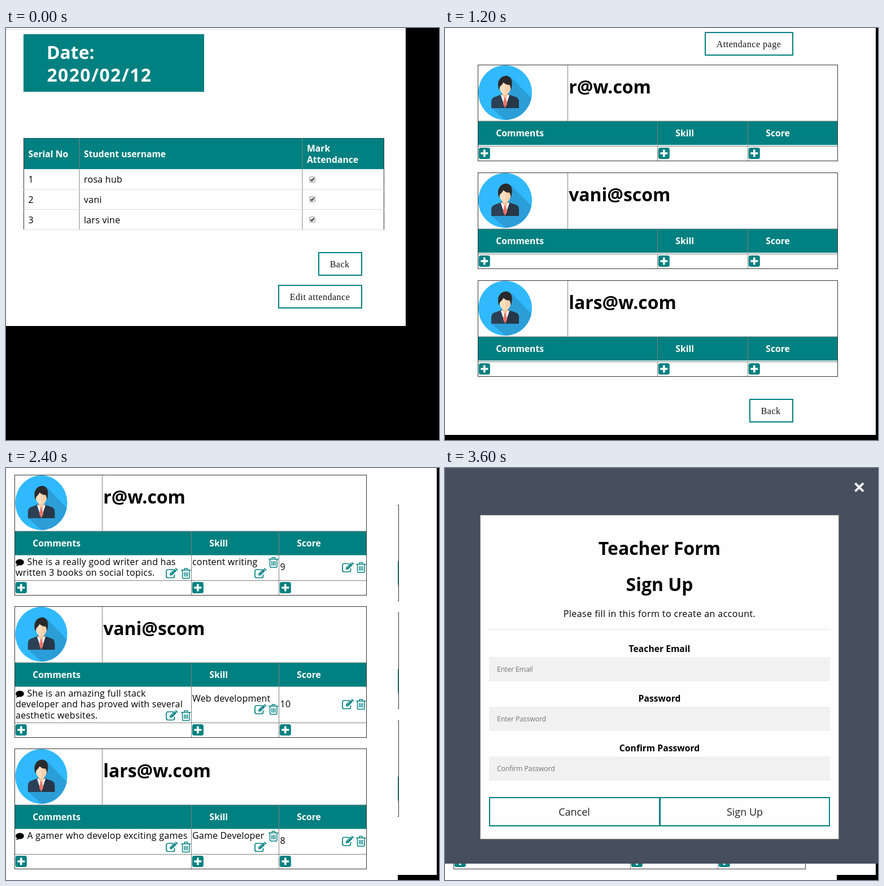
An HTML page that plays this animation: 767 px wide and 730 px high, repeating every 4.8 s.

```html
<!DOCTYPE html>
<html lang="en">
<head>
<meta charset="utf-8">
<title>Attendance screens</title>
<style>
  html, body { margin: 0; width: 100%; height: 100%; overflow: hidden; background: #000; }
  svg { display: block; width: 767px; height: 730px; }
  text { font: 16px "Open Sans", "Noto Sans", sans-serif; letter-spacing: .25px; fill: #000; white-space: pre; }
  .skill { letter-spacing: .18px; }
  .lead { letter-spacing: .44px; }
  .bold { font-weight: 700; font-size: 15.7px; letter-spacing: 0; }
  .title { font-weight: 700; font-size: 31.9px; letter-spacing: 0; }
  .date { letter-spacing: 1.4px; }
  .white { fill: #fff; }
  .serif { font-family: "Liberation Serif", Times, serif; letter-spacing: .5px; fill: #111; }
  .hint { font-size: 12.4px; letter-spacing: -.2px; fill: #757575; }
  .action { font-size: 18px; letter-spacing: 0; fill: #222; }
  .mid { text-anchor: middle; }
</style>
</head>
<body>
<svg id="stage" viewBox="0 0 767 730"></svg>
<script>
const TEAL = '#008080', INK = '#333', GRAY = '#808080';
const SCREEN_MS = 1200;

const text = (x, y, s, cls = '') => `<text x="${x}" y="${y}" class="${cls}">${s}</text>`;
const rect = (x, y, w, h, fill, more = '') =>
  `<rect x="${x}" y="${y}" width="${w}" height="${h}" fill="${fill}" ${more}/>`;
const box = (x, y, w, h, color, line = 1) =>
  rect(x + line / 2, y + line / 2, w - line, h - line, 'none', `stroke="${color}" stroke-width="${line}"`);
const hline = (x, y, w, color) => rect(x, y, w, 1, color);
const vline = (x, y, h, color) => rect(x, y, 1, h, color);
const path = (d, fill, more = '') => `<path d="${d}" fill="${fill}" ${more}/>`;
const at = (x, y, body) => `<g transform="translate(${x} ${y})">${body}</g>`;

const button = (x, y, w, label) =>
  box(x, y, w, 42, TEAL, 2) + text(x + 20.7, y + 27, label, 'serif');

const checkbox = (x, y) => at(x, y,
  rect(.5, .5, 10, 10, '#e4e4e4', 'rx="1.5" stroke="#a9a9a9"') +
  path('M2.6 5.4L4.7 7.8L8.6 2.8', 'none', 'stroke="#333" stroke-width="2"'));

const plus = (x, y) => at(x, y,
  rect(0, 0, 20, 20, TEAL, 'rx="3.5"') +
  path('M10 3.5V16.5M3.5 10H16.5', 'none', 'stroke="#fff" stroke-width="3.6"'));

const pencil = (x, y) => at(x, y,
  path('M13.5 3H4Q1 3 1 6V14.5Q1 17.5 4 17.5H12.5Q15.5 17.5 15.5 14.5V11.5', 'none',
    `stroke="${TEAL}" stroke-width="1.7"`) +
  path('M7 13.6V10L15.6 1.8L19 5.2L10.6 13.6ZM16.5 1L18 .2L21.7 3.5L20 5Z', TEAL) +
  path('M9 10.5L15.5 4.1M8 11.4L9.6 13', 'none', 'stroke="#fff" stroke-width=".8"'));

const trash = (x, y) => at(x, y,
  path('M0 4H17.5M5.5 4L6.5 1H11L12 4M2.5 4V16Q2.5 18.6 4.5 18.6H13Q15 18.6 15 16V4M6 7.5V15.5M8.8 7.5V15.5M11.6 7.5V15.5',
    'none', `stroke="${TEAL}" stroke-width="1.5"`));

const bubble = (x, y) => at(x, y,
  '<ellipse cx="7.5" cy="5.6" rx="7.4" ry="5.5"/>' + path('M2 8Q2.6 11 .6 12.6Q4.6 12.4 7 10Z', '#000'));

// Centred on the disc; rx squeezes the picture sideways.
const avatar = (cx, cy, rx) =>
  `<g transform="translate(${cx} ${cy}) scale(${rx / 48.5} 1)">` +
  '<circle r="48.5" fill="#31b9fd"/>' +
  '<g clip-path="url(#disc)">' + path('M11-27L60 22L30 74L-25 27Z', '#2b9ed8') + '</g>' +
  path('M-25 27.5V16Q-25 9-17 7L-6 3H6L17 7Q25 9 25 16V27.5Z', '#2d4156') +
  path('M0 4H6L17 7Q25 9 25 16V27.5H0Z', '#273747') +
  path('M-8 4L0 27L8 4Z', '#fff') +
  path('M-2.6 8H2.6L1.8 11.5L3.8 20L0 27L-3.8 20L-1.8 11.5Z', '#ea7468') +
  path('M-5-2H5V5L0 10L-5 5Z', '#efc5a0') +
  path('M-10-18Q-10-24 0-24Q10-24 10-18V-9Q9 2 0 4Q-9 2-10-9Z', '#fddfbf') +
  path('M0-24Q10-24 10-18V-9Q9 2 0 4Z', '#f8d2ae') +
  path('M-11-5Q-14-13-12-20Q-8-30 3-30Q13-28 12.5-16L11-5Q10-9 8-14Q2-13-3-18Q-6-13-9-11Z', '#2a2a2c') +
  '</g>';

// x, y, w: outer box; cols: inner column lines; note: height of the filled row.
function profile({ x, y, w, cols, photo, name, note, gap = 0 }) {
  const [mid, c1, c2] = cols;
  const line = y + 142 + note, end = line + 26;
  const starts = [x, c1, c2];
  return avatar(photo[0], y + 49.5, photo[1]) +
    vline(mid, y, 100, GRAY) +
    text(mid + 2.2, y + 51, name, 'title') +
    rect(x, y + 100, w, 42.5, TEAL) +
    hline(x, y + 99.5, w, GRAY) +
    [c1, c2].map(c => vline(c, y + 100, end - y - 100, GRAY)).join('') +
    (gap ? rect(x + 1, y + 142.5, w - 2, 1.5, '#fff') : '') +
    hline(x, line, w, GRAY) +
    ['Comments', 'Skill', 'Score'].map((s, i) => text(starts[i] + 32.3, y + 127.3, s, 'bold white')).join('') +
    starts.map(s => plus(s + 1.8, line + 3)).join('') +
    box(x, y, w, end - y + 1, INK);
}

const people = [
  { name: 'rosa hub', mail: 'r@w.com' },
  { name: 'vani', mail: 'vani@scom' },
  { name: 'lars vine', mail: 'lars@w.com' }
];

function attendance() {
  const row = (p, i) => {
    const y = 250 + i * 35.6;
    return text(39.5, y + 24.3, i + 1) + text(138, y + 24.3, p.name) +
      checkbox(537, Math.round(y + 12.5)) + hline(31, Math.round(y + 35.5), 639, '#ddd');
  };
  return rect(0, 0, 767, 730, '#000') + rect(0, 0, 708, 528, '#fff') +
    hline(0, 2, 708, '#dcdcdc') +
    rect(31, 11, 320, 102, TEAL) +
    text(72, 55, 'Date:', 'title white') + text(72.5, 95, '2020/02/12', 'title date white') +
    rect(31, 195, 639, 55, TEAL) + hline(31, 195, 639, '#174848') +
    text(39.5, 229, 'Serial No', 'bold white') + text(138, 229, 'Student username', 'bold white') +
    text(533, 219.3, 'Mark', 'bold white') + text(533, 238.8, 'Attendance', 'bold white') +
    [130, 525].map(x => vline(x - .5, 195, 162, GRAY)).join('') +
    [31, 669].map(x => vline(x, 195, 162, INK)).join('') +
    people.map(row).join('') +
    button(553, 397, 78, 'Back') + button(482, 455, 149, 'Edit attendance');
}

function emptyProfiles() {
  return rect(0, 0, 767, 730, '#000') + rect(0, 0, 763, 721, '#fff') +
    button(460, 7, 157, 'Attendance page') +
    people.map((p, i) => profile({
      x: 58, y: 65 + i * 191, w: 638, cols: [217, 376, 536],
      photo: [106.5, 47.5], name: p.mail, note: 2, gap: 1
    })).join('') +
    button(539, 657, 78, 'Back');
}

function filledProfiles() {
  const cards = [
    { y: 12, note: 45, lines: ['She is a really good writer and has', 'written 3 books on social topics.'],
      skill: 'content writing', score: 9 },
    { y: 245, note: 64, lines: ['She is an amazing full stack', 'developer and has proved with several', 'aesthetic websites.'],
      skill: 'Web development', score: 10, oneRow: true },
    { y: 497, note: 45, lines: ['A gamer who develop exciting games'],
      skill: 'Game Developer', score: 8 }
  ];
  const card = (c, i) => {
    const top = c.y + 142, base = top + c.note, half = top + c.note / 2;
    const skillY = c.oneRow ? base - 33 : base - 22;
    return profile({
      x: 15, y: c.y, w: 624, cols: [170, 328, 483],
      photo: [62.5, 46], name: people[i].mail, note: c.note
    }) +
      bubble(17, top + 7.5) +
      c.lines.map((s, n) => text(n ? 17 : 37.5, top + 17.7 + n * 19.6, s)).join('') +
      pencil(283, base - 22) + trash(310, base - 22) +
      text(330, c.oneRow ? top + 27 : top + 17.7, c.skill, 'skill') +
      pencil(440, skillY) + trash(465, c.oneRow ? skillY : top + 3.5) +
      text(485.5, half + 4.6, c.score) +
      pencil(595, half - 10) + trash(620, half - 10);
  };
  return rect(0, 6, 694, 724, '#fff') + cards.map(card).join('');
}

function signUp() {
  const field = (y, label, hint) =>
    text(380, y - 9, label, 'bold mid') + rect(78, y, 604, 43, '#f1f1f1') + text(92, y + 26, hint, 'hint');
  return rect(0, 0, 767, 701, '#474e5d') +
    path('M726.5 26.8L741 41.3M741 26.8L726.5 41.3', 'none', 'stroke="#f1f1f1" stroke-width="4"') +
    rect(62, 83, 636, 575, '#fefefe') + box(62, 83, 636, 575, '#888') +
    text(380, 154, 'Teacher Form', 'title mid') + text(380, 218, 'Sign Up', 'title mid') +
    text(380, 264, 'Please fill in this form to create an account.', 'lead mid') +
    rect(78, 285, 604, 1.5, '#ececec') +
    field(335, 'Teacher Email', 'Enter Email') +
    field(423, 'Password', 'Enter Password') +
    field(511, 'Confirm Password', 'Confirm Password') +
    box(78, 583, 303, 52, TEAL, 2) + box(380, 583, 302, 52, TEAL, 2) +
    text(229, 615.5, 'Cancel', 'action mid') + text(531, 615.5, 'Sign Up', 'action mid');
}

// Each screen is laid over the ones before it.
const stage = document.getElementById('stage');
stage.innerHTML = '<defs><clipPath id="disc"><circle r="48.5"/></clipPath></defs>' +
  [attendance, emptyProfiles, filledProfiles, signUp].map(f => `<g class="screen">${f()}</g>`).join('');
const screens = [...stage.querySelectorAll('.screen')];

function draw(ms) {
  const step = Math.floor(ms / SCREEN_MS) % screens.length;
  screens.forEach((s, i) => s.setAttribute('visibility', i <= step ? 'visible' : 'hidden'));
}

function tick() {
  draw(performance.now());
  requestAnimationFrame(tick);
}
tick();
</script>
</body>
</html>
```
